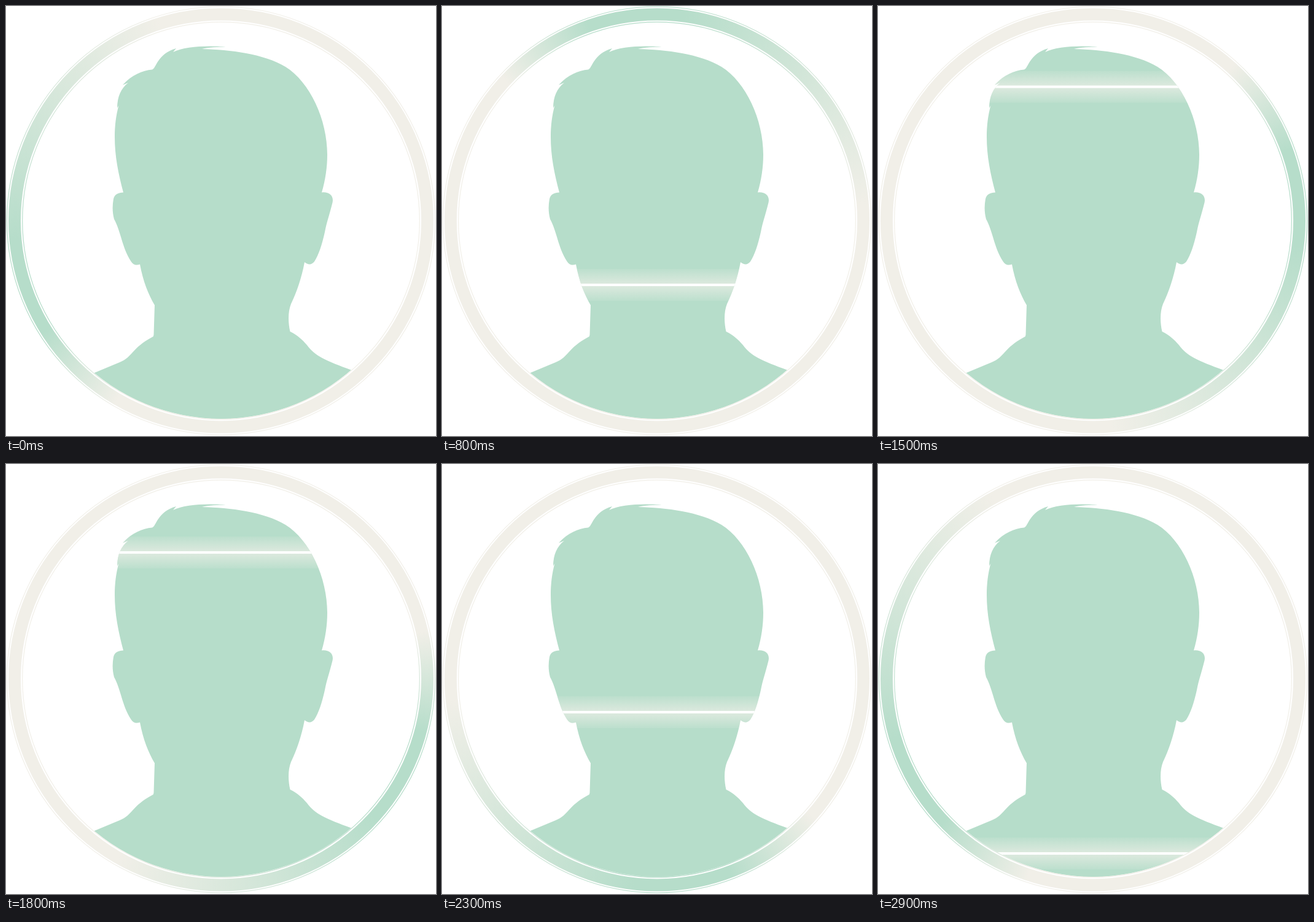
These frames come from a looping animation (700x700 px, 3 s). An HTML page with a canvas:

```html
<!DOCTYPE html>
<html lang="en">
<head>
<meta charset="utf-8">
<style>
  html, body { margin: 0; height: 100%; overflow: hidden; background: #fff; }
  canvas { display: block; }
</style>
</head>
<body>
<canvas id="stage" width="700" height="700"></canvas>
<script>
const ctx = document.getElementById('stage').getContext('2d');
const LOOP = 3000, STEP = 100, TAU = Math.PI * 2;
const CX = 350, CY = 349.5;
const GREEN = '#b6ddca', BEIGE = '#f1efe8';

const person = new Path2D(`M80 625 L143 597.5 L185 580 C207 571 203 558 238 539 Q240.500 538 240.500 535
  L242 487 C232 470 223 448 218 420.500 C213 422 208 423 203 415 C189 393 187 367 176 347
  C173 336 173 325 175 314 C177 306 183 304 191 303.500 C183 273 177 245 177 213
  C177 195 179 178 183.500 162 L181 166 C181 148 187 134 199 125 L190 128.500
  C205 112 222 105 238 103.500 C245 101 246 78 277 69 L272 75 C290 66 325 64 358 66.500
  C345 67 330 67 319 70 C365 71 420 78 455 99 C495 124 523 185 523 242
  C523 262 520 283 514 303.500 C526 302 534 309 531.500 320 C526 342 522 352 519 368
  C514 390 509 405 502 416 C497 422 492 421.500 486 417 C481 444 473 466 464 485
  C459 497 459 515 462.500 530 C475 536 482 543 490 552 C503 570 520 577 563 593
  L620 615 V700 H80 Z`);

// Scan line height over time: [ms, y]
const scan = [[0, 704], [400, 584], [800, 454], [1200, 274], [1600, 84],
              [1800, 144], [2300, 404], [2900, 634], [3000, 704]];

function scanY(t) {
  const i = scan.findIndex(([end]) => end > t);
  const [t0, y0] = scan[i - 1], [t1, y1] = scan[i];
  return y0 + (y1 - y0) * (t - t0) / (t1 - t0);
}

function ring(radius, width, color) {
  ctx.beginPath();
  ctx.arc(CX, CY, radius, 0, TAU);
  ctx.lineWidth = width;
  ctx.strokeStyle = color;
  ctx.stroke();
}

function drawRings(t) {
  const turn = TAU * t / LOOP;
  const start = (126 - 6 * Math.cos(turn)) * TAU / 360 + turn;
  const sweep = ctx.createConicGradient(start, CX, CY);
  [[0, BEIGE], [28, GREEN], [55, GREEN], [133, BEIGE], [360, BEIGE]]
    .forEach(([deg, color]) => sweep.addColorStop(deg / 360, color));
  ring(348.5, 1.2, sweep);
  ring(336, 20, sweep);
  ring(323.3, 1.2, sweep);
}

function drawPerson(y) {
  ctx.save();
  ctx.beginPath();
  ctx.arc(CX, CY, 322.5, 0, TAU);
  ctx.clip();
  ctx.clip(person);
  ctx.fillStyle = GREEN;
  ctx.fillRect(0, 0, 700, 700);

  const glow = ctx.createLinearGradient(0, y - 26, 0, y + 26);
  [[0, .1], [.5, .68], [1, .1]]
    .forEach(([at, alpha]) => glow.addColorStop(at, `rgba(241,240,233,${alpha})`));
  ctx.fillStyle = glow;
  ctx.fillRect(0, y - 26, 700, 52);
  ctx.fillStyle = '#fff';
  ctx.fillRect(0, y - 2, 700, 4);
  ctx.restore();
}

function draw() {
  const t = Math.floor(performance.now() % LOOP / STEP) * STEP;
  ctx.clearRect(0, 0, 700, 700);
  drawPerson(scanY(t));
  drawRings(t);
  requestAnimationFrame(draw);
}
draw();
</script>
</body>
</html>
```
